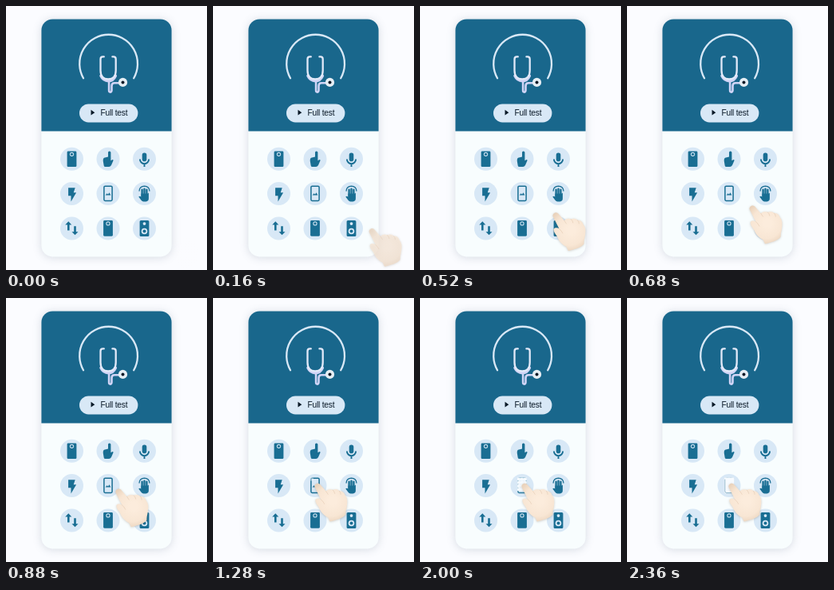
An HTML page with a canvas for the animation above (2760 ms loop, 252x330 px).

```html
<!DOCTYPE html>
<html lang="en">
<head>
<meta charset="utf-8">
<title>Device test</title>
<style>
html, body { margin: 0; width: 100%; height: 100%; overflow: hidden; background: #fbfcff; }
canvas { display: block; width: 252px; height: 330px; }
</style>
</head>
<body>
<canvas id="stage"></canvas>
<script>
const W = 252, H = 330, LOOP = 2760;
const PAGE = '#fbfcff', BODY = '#f8fdfe', BLUE = '#19678c', TEAL = '#196e93';
const PALE = '#d8e8f6', LILAC = '#d0d4f6', INK = '#0b1a28', LIT = '#f7fbff';
const canvas = document.getElementById('stage');
const c = canvas.getContext('2d');
const scale = window.devicePixelRatio || 1;
canvas.width = W * scale;
canvas.height = H * scale;

const clamp = v => Math.max(0, Math.min(1, v));
const ramp = (t, a, b) => clamp((t - a) / (b - a));

function fill(path, color) {
  c.fillStyle = color;
  c.fill(path);
}

function stroke(d, color, width, cap = 'round') {
  c.strokeStyle = color;
  c.lineWidth = width;
  c.lineCap = cap;
  c.stroke(new Path2D(d));
}

function box(x, y, w, h, r, color) {
  const p = new Path2D();
  p.roundRect(x, y, w, h, r);
  fill(p, color);
}

function disc(x, y, r, color) {
  const p = new Path2D();
  p.arc(x, y, r, 0, 7);
  fill(p, color);
}

function shape(d, color) {
  fill(new Path2D(d), color);
}

function shadow(color, blur, y) {
  c.shadowColor = color;
  c.shadowBlur = blur * scale;
  c.shadowOffsetY = y * scale;
}

// Icons are drawn around their own centre.
function phoneBack() {
  box(-5.9, -9.8, 11.8, 19.6, 1.4, TEAL);
  disc(0, -6, 2.6, PALE);
  disc(0, -6, 1.6, TEAL);
}

function pointer() {
  shape('M0 -8.2Q0 -9.8 1.7 -9.8T3.4 -8.2V2L5.6 .8Q6.6 .9 6.5 2L4 7.8Q2.8 9.8 1 9.8H-3.5Q-5 9.8 -5.3 8.2L-6.3 2.2Q-6.5 -1 -5 -1.5L0 -2.8Z', TEAL);
}

function mic() {
  box(-2.8, -7.7, 5.6, 10.6, 2.8, TEAL);
  stroke('M-5.6 .2A5.6 5.7 0 0 0 5.6 .2M0 5.9V9.8', TEAL, 1.9, 'butt');
}

function flash() {
  shape('M-4.4 -7.4H4.2L2.2 -1.4H5.6L-1 10V2.6H-4.4Z', TEAL);
}

function screen() {
  stroke('M-3.7 -9.4H3.7Q5.1 -9.4 5.1 -8V7.4Q5.1 8.8 3.7 8.8H-3.7Q-5.1 8.8 -5.1 7.4V-8Q-5.1 -9.4 -3.7 -9.4Z', TEAL, 1.5);
  shape('M-3.3 2L-1.5 -.4L0 .8L1.5 -1.4L3.3 2Z', TEAL);
}

function fingers() {
  stroke('M-2.9 -5V3M0 -6V3M2.9 -5V3', TEAL, 2.4);
  shape('M-4.1 0H4.1L5.4 -1V6Q5.4 9.8 2 9.8H-1Q-2.8 9.8 -4 8.2L-7.2 3.8Q-6 2.4 -4.1 4Z', TEAL);
  stroke('M-6.4 -3.6Q-6 -9.2 0 -9.4Q6 -9.2 6.4 -3.6', TEAL, 1.3);
}

function arrows() {
  shape('M-4.2 -8.6L-8.2 -4.5H-5.5V2.5H-2.9V-4.5H-.2ZM4 8.4L8 4.3H5.3V-2.7H2.7V4.3H0Z', TEAL);
}

function speaker() {
  box(-5.9, -10, 11.8, 20, 1.5, TEAL);
  disc(0, -5.8, 1.9, PALE);
  disc(0, 3.6, 3.8, PALE);
  disc(0, 3.6, 2, TEAL);
}

const icons = [phoneBack, pointer, mic, flash, screen, fingers, arrows, phoneBack, speaker];

function drawCard() {
  c.save();
  shadow('rgba(80,100,125,.22)', 11, 1);
  box(44.4, 16.4, 163.2, 297, 14, BODY);
  c.restore();
  box(44.4, 16.4, 163.2, 140.2, [14, 14, 0, 0], BLUE);
}

function drawStethoscope() {
  stroke('M97 90.2A36.4 36.4 0 1 1 160.2 90.2', PALE, 2.3);
  stroke('M129.1 93V105.6Q129.1 107.6 130.7 107.6T132.5 105.4V100Q132.5 96.3 136 96.3H141', LILAC, 2.6);
  stroke('M119 87.3Q122 93.6 128.3 93.6T137.3 87.3', LILAC, 3.6);
  stroke('M122.8 63.4H121.4Q118.5 63.4 118.5 66.4V80.4Q118.5 91.4 128.1 91.4T137.7 80.4V66.4Q137.7 63.4 134.8 63.4H133.4', '#e2e9f8', 2.3);
  disc(146.5, 95.4, 5.6, '#e6eef4');
  disc(146.5, 95.4, 2, INK);
}

function drawButton() {
  box(92, 122.4, 73.4, 23, 11.5, PALE);
  shape('M106.5 129.8L111.3 133.2L106.5 136.6Z', INK);
  c.fillStyle = INK;
  c.font = '10.2px "Liberation Sans", Arial, sans-serif';
  c.letterSpacing = '-0.2px';
  c.fillText('Full test', 118.4, 137.4);
}

function drawIcons() {
  icons.forEach((icon, i) => {
    const x = 82.5 + (i % 3) * 45.5, y = 191.3 + Math.floor(i / 3) * 43.3;
    disc(x, y, 14.5, PALE);
    c.save();
    c.translate(x, y);
    icon();
    c.restore();
  });
}

// Screen cells light up one after another, then the whole screen does.
function drawTouchTest(t) {
  const p = ramp(t, 1260, 1860) * 12, merge = ramp(t, 1960, 2360);
  for (let i = 0; i < 12; i++) {
    c.globalAlpha = clamp(p - i);
    box(122 + (i % 3) * 4, 224.6 + Math.floor(i / 3) * 4.2, 3.9, 4, .4, LIT);
  }
  c.globalAlpha = merge;
  box(121.8, 224.4, 12.4, 20, 1.8, LIT);
  c.globalAlpha = merge * .55;
  stroke('M122.8 227V241.5Q122.8 243.5 124.8 243.5H133', BLUE, .8);
  c.globalAlpha = 1;
}

const hand = new Path2D('M.4 5.2C-.8 1.8 3.6 -1.6 6.8 1.4L14.5 10.2C17 7.6 20.2 7.2 23 8.6C26 7 29.4 7.6 31.2 9.8C34.6 9.4 37.4 11.4 38.4 15C41 18 41.6 22 40.8 27C40.4 32 39.2 34 39.2 39.2C36 44 26 46.5 19.6 48L17 42.8C11 40 7.5 35 5.5 30C3.2 27 1 24 1.2 21.4C2 18.6 5.8 19 8.2 20.6Z');

function drawHand(t) {
  const m = ramp(t, 105, 1005);
  c.save();
  c.globalAlpha = ramp(t, 0, 220);
  c.translate(200 - 72.8 * m, 280.8 - 49.4 * m);
  const g = c.createRadialGradient(23, 22, 5, 21, 23, 28);
  g.addColorStop(0, '#fcecdc');
  g.addColorStop(.6, '#f8e6d4');
  g.addColorStop(1, '#e9d2bb');
  shadow('rgba(100,85,70,.28)', 3, .6);
  fill(hand, g);
  shadow('transparent', 0, 0);
  stroke('M14.5 10.2L17 14M23 8.6Q25 10 25.5 13M31.2 9.8Q33 11.5 33 14M8.2 20.6Q11 22.5 12.5 26', 'rgba(215,185,158,.5)', .8);
  c.restore();
}

function draw(t) {
  c.setTransform(scale, 0, 0, scale, 0, 0);
  c.lineJoin = 'round';
  c.fillStyle = PAGE;
  c.fillRect(0, 0, W, H);
  drawCard();
  drawStethoscope();
  drawButton();
  drawIcons();
  drawTouchTest(t);
  drawHand(t);
}

const start = performance.now();
function tick() {
  draw((performance.now() - start) % LOOP);
  requestAnimationFrame(tick);
}
tick();
</script>
</body>
</html>
```
